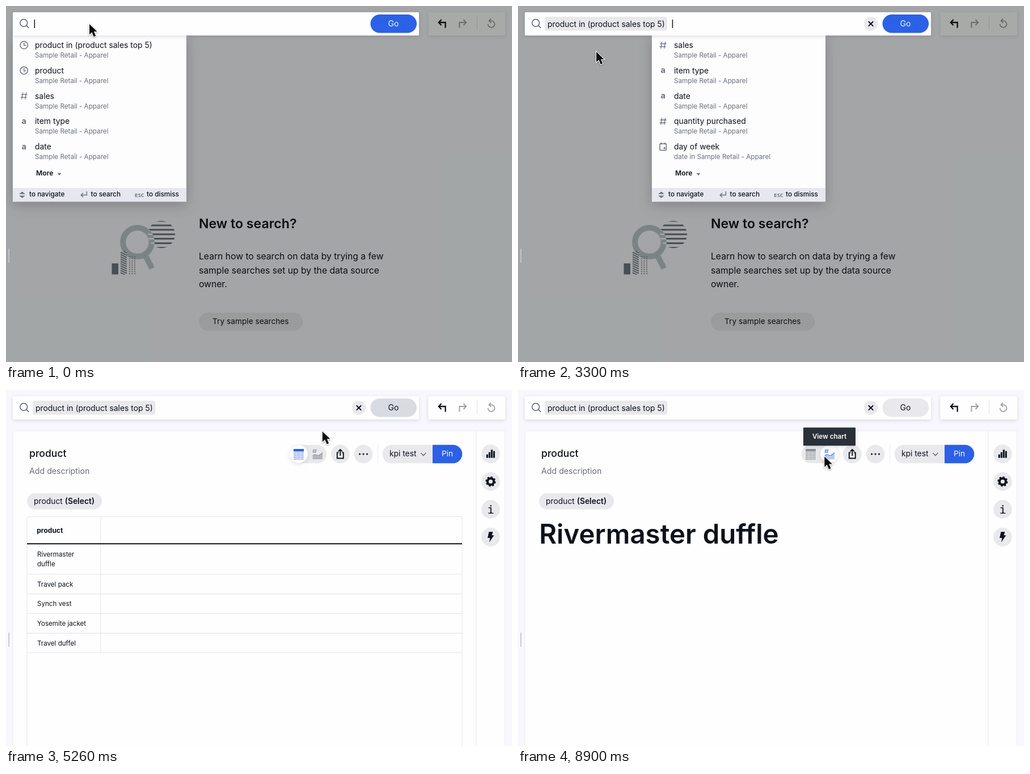
Animation, 892 px wide and 628 px high, one loop 8.93 s. Source, as an HTML page:

```html
<!DOCTYPE html>
<html lang="en">
<head>
<meta charset="utf-8">
<title>Search to answer</title>
<style>
  html, body { margin: 0; width: 100%; height: 100%; overflow: hidden; background: #f7f7fd; }
  svg { display: block; width: 892px; height: 628px; }
  text { font-family: Inter, "Liberation Sans", sans-serif; font-optical-sizing: none; white-space: pre; }
  .mono { font-family: "Noto Sans Mono", "DejaVu Sans Mono", monospace; }
  .card { filter: drop-shadow(0 2px 3px rgba(30, 34, 50, .13)); }
  .menu { filter: drop-shadow(0 6px 11px rgba(45, 35, 55, .26)); }
  .pointer { filter: drop-shadow(0 1.5px 1.5px rgba(0, 0, 0, .35)); }
</style>
</head>
<body>
<svg id="stage" viewBox="0 0 892 628"></svg>
<script>
const LOOP = 8930;
const INK = '#0c111b', GREY = '#6b7280', SOFT = '#e9e9ed', BLUE = '#2b60e8', LINE = '#e6e6ea';

// Markup helpers
const text = (x, y, s, size, fill = INK, weight = 400, more = '') =>
  `<text x="${x}" y="${y}" font-size="${size}" fill="${fill}" font-weight="${weight}" ${more}>${s}</text>`;
const rect = (x, y, w, h, fill, r = 0, more = '') =>
  `<rect x="${x}" y="${y}" width="${w}" height="${h}" rx="${r}" fill="${fill}" ${more}/>`;
const disc = (x, y, r, fill, more = '') => `<circle cx="${x}" cy="${y}" r="${r}" fill="${fill}" ${more}/>`;
const fill = (d, color, more = '') => `<path d="${d}" fill="${color}" ${more}/>`;
const line = (d, color, w, more = '') => `<path d="${d}" fill="none" stroke="${color}" stroke-width="${w}" ${more}/>`;
const group = (id, body, more = '') => `<g id="${id}" ${more}>${body}</g>`;
const at = (x, y, body) => `<g transform="translate(${x} ${y})">${body}</g>`;
const clip = (id, shape, body) => `<clipPath id="${id}">${shape}</clipPath><g clip-path="url(#${id})">${body}</g>`;
const range = (n, f) => Array.from({ length: n }, (_, i) => f(i)).join('');

// Suggestion menu
const icons = {
  clock: disc(0, 0, 6.6, 'none', `stroke="${GREY}" stroke-width="1.5"`) + line('M0 -4V.6H3.6', GREY, 1.5),
  number: line('M-2 -6L-4 6M4 -6L2 6M-5 -2.4H6M-6 2.6H5', GREY, 1.3),
  label: text(0, 4.6, 'a', 14.6, GREY, 700, 'text-anchor="middle"'),
  calendar: rect(-5.7, -5.2, 11.4, 11.4, 'none', 1, `stroke="${GREY}" stroke-width="1.5"`) +
    rect(1, 1, 3, 3, GREY) + line('M-3.2 -7.2V-4M3.2 -7.2V-4', GREY, 1.7)
};
const SET = 'Sample Retail - Apparel';
const row = {
  recent: ['clock', 'product in (product sales top 5)'],
  product: ['clock', 'product'],
  sales: ['number', 'sales'],
  type: ['label', 'item type'],
  date: ['label', 'date'],
  quantity: ['number', 'quantity purchased'],
  day: ['calendar', 'day of week', 'date in ' + SET]
};

function menu(id, rows, verb, picked, dx = 0) {
  const more = rows.length > 4;
  const foot = more ? 321 : 64 + 44.8 * rows.length;
  const shift = verb === 'select' ? 2 : 0;
  const items = rows.map(([icon, name, sub = SET], i) => {
    const y = 44.8 * i;
    return at(31.7, 69 + y, icons[icon]) + text(51, 74 + y, name, 13.9) + text(51, 91 + y, sub, 11.7, '#6a6f7c');
  }).join('');
  const footer = rect(12, 0, 306, 24.3, '#e7e8ef') +
    fill('M23 10.8L28.5 6.4L34 10.8ZM23 13.4L28.5 17.8L34 13.4Z', GREY) +
    text(41, 15, 'to navigate', 11.8, INK, 500) +
    at(shift, 0, line('M142.3 6V12.6H132.5M136 9L132.3 12.6L136 16.2', GREY, 1.5) +
      text(149.5, 15, 'to ' + verb, 11.8, INK, 500)) +
    text(227, 16, 'ESC', 9.1, GREY, 700, 'class="mono"') +
    text(248, 15, 'to dismiss', 11.8, INK, 500);
  return group(id,
    rect(12, 50, 306, foot - 26, '#fdfdfe', 0, 'class="menu"') +
    (picked ? rect(12, 55.6, 306, 44.8, '#e5eafa') : '') + items +
    (more ? text(53, 299, 'More', 12.2, INK, 600) + fill('M90.5 294.8H97.5L94 298.9Z', GREY) : '') +
    at(0, foot, footer), `transform="translate(${dx} 0)"`);
}

const menus = [
  [0, 'recents', [row.recent, row.product, row.sales, row.type, row.date], 'search', false],
  [800, 'picked', [row.recent, row.product, row.sales, row.type, row.date], 'select', true],
  [1160, 'wide', [row.recent, row.product, row.quantity, row.type, row.day], 'select', true],
  [1600, 'narrow', [row.recent, row.product, row.type, row.quantity], 'select', true],
  [2160, 'exact', [row.recent, row.product], 'select', true],
  [3200, 'next', [row.sales, row.type, row.date, row.quantity, row.day], 'search', false, 224]
];

// Empty state with its illustration
function welcome() {
  const stripes = color => range(7, i => line(`M249 ${379 + 7.9 * i}H299`, color, 3));
  const ball = disc(274, 403, 24);
  const hatch = range(11, i => line(`M201 ${430 + 4 * i}l13 6`, GREY, 1.9));
  const dots = range(27, i => rect(217 + 4.6 * (i % 3), 441 + 3.8 * (i / 3 | 0), 1.7, 1.7, GREY));
  return clip('ball', ball, stripes(GREY)) +
    disc(231.5, 416.5, 25.3, 'none', 'stroke="#b9c2cb" stroke-width="10"') +
    line('M245.5 440L257.5 463', '#b9c2cb', 10) +
    clip('lens', disc(231.5, 416.5, 30.3), clip('overlap', ball, stripes('#f3f4f8'))) +
    rect(186.5, 454, 11.5, 19.5, GREY) + rect(202, 433, 11, 40.5, '#f7f7fd') +
    clip('bar', rect(202, 433, 11, 40.5), hatch) + dots +
    text(340, 391.9, 'New to search?', 23.1, INK, 600) +
    text(340, 447, 'Learn how to search on data by trying a few', 15.68) +
    text(340, 471.6, 'sample searches set up by the data source', 15.68) +
    text(340, 496, 'owner.', 15.68) +
    rect(340, 541, 183.5, 32, SOFT, 16) +
    text(431.3, 560.6, 'Try sample searches', 13.7, INK, 400, 'text-anchor="middle"');
}

const tableIcon = (head, cell) => rect(507, 104, 18, 4.4, head) +
  range(15, i => rect(507 + 6.1 * (i % 3), 109.3 + 2.9 * (i / 3 | 0), 5.6, 2.2, cell));
const chartIcon = (mark, area, id = '') => group(id,
  line('M543 104L542 111.4M546.2 104L545.2 111.4M540.4 106.3H547.6M540 109.2H547', mark, 1) +
  fill('M540.5 117Q544 113.5 548 116T558 111.5V122.3H540.5Z', area) +
  line('M540.5 116Q544 112.8 548 115T558 110.5', mark, 1.3));
const knob = x => disc(x, 113, 16, '#fdfdff', 'class="card"');

function answer() {
  const round = (x, y, body) => disc(x, y, 16.4, SOFT) + at(x, y, body);
  const dim = '#8d9096', pale = '#b3b5ba';
  const names = ['Travel pack', 'Synch vest', 'Yosemite jacket', 'Travel duffel'];
  const table = rect(37.5, 272, 766, 53, '#f1f2f6', 0, 'id="rowHover"') +
    line('M37 640V223.5H804V640', LINE, 1) + line('M167 224V463', LINE, 1) +
    [325, 359.7, 394.4, 429.2, 463].map(y => line(`M37 ${y}H804`, LINE, 1.2)).join('') +
    line('M37 271.3H804', INK, 2) +
    text(54.3, 252.3, 'product', 12, INK, 700) +
    text(55, 294.3, 'Rivermaster', 11.6) + text(55, 310.8, 'duffle', 11.6) +
    names.map((s, i) => text(55, 346.6 + 34.7 * i, s, 11.6)).join('');
  return rect(12, 72, 867.5, 570, '#fefefe', 0, 'stroke="#ededf3"') + line('M829 72V628', '#e8e8ef', 1) +
    rect(36, 130.5, 765, 25, '#f1f1f5', 3, 'id="noteHover"') +
    text(41, 118.3, 'product', 17.6, INK, 500) +
    text(41, 147.6, 'Add description', 14.2, '#696e7a') +
    rect(37, 182, 132.3, 28.5, SOFT, 14.2) +
    text(49, 201, 'product <tspan font-weight="600">(Select)</tspan>', 13.85) +
    rect(500, 96.7, 65, 32.5, SOFT, 16.2) +
    group('tableMode', knob(516) + tableIcon(BLUE, '#aec0f6') + chartIcon(dim, pale, 'chartIdle')) +
    group('chartMode', knob(549) + tableIcon(dim, pale) + chartIcon('#4c7df0', '#b3c9f8')) +
    round(589.3, 113, line('M-3 -2.5H-5.5V7.5H5.5V-2.5H3M0 3V-7.5M-3.6 -4.6L0 -8L3.6 -4.6', INK, 1.9)) +
    round(630, 113, disc(-6.4, 0, 1.6, INK) + disc(0, 0, 1.6, INK) + disc(6.4, 0, 1.6, INK)) +
    line('M655.5 97V129', '#ececf0', 1) +
    fill('M752 96.7H680A16.2 16.2 0 0 0 680 129.2H752Z', SOFT) +
    fill('M752 96.7H788A16.2 16.2 0 0 1 788 129.2H752Z', BLUE) +
    text(676, 117.4, 'kpi test', 13.8) + line('M731.3 111L735.8 115.5L740.3 111', GREY, 1.7) +
    text(778, 117.4, 'Pin', 13.7, '#fff', 400, 'text-anchor="middle"') +
    round(854.4, 112.7, range(4, i => rect(-7.6 + 4 * i, [1, -3, -7.5, -5][i], 3, [6, 10, 14.5, 12][i], INK))) +
    round(854.4, 161.5, disc(0, 0, 5.6, 'none', `stroke="${INK}" stroke-width="4"`) +
      disc(0, 0, 7.8, 'none', `stroke="${INK}" stroke-width="2.6" stroke-dasharray="3.06"`)) +
    round(854.4, 210.5, text(0, 7.3, 'i', 20, INK, 500, 'class="mono" text-anchor="middle"')) +
    round(854.4, 259.3, fill('M-3 -9H4L2 -3H6L-2.6 9.5L-1 1.6H-5.4Z', INK)) +
    group('table', table) +
    group('headline', text(37.2, 270.6, 'Rivermaster duffle', 47.4, INK, 600)) +
    group('tip', rect(503, 66.3, 92, 32, '#2a3039', 1, 'class="card"') +
      text(549, 86.1, 'View chart', 11.6, '#fff', 600, 'text-anchor="middle"'));
}

const toolbar = rect(744.5, 11, 135.5, 41, '#fefefe', 2, 'class="card"') +
  line('M767.5 24L762.8 29L767.5 34M763 29H774.6V38.5', INK, 2.3) +
  line('M806.5 24L811.2 29L806.5 34M811 29H799.4V38.5', '#9d9fa6', 1.9) +
  line('M830.5 19V43', '#e2e2e8', 1) +
  line('M849.6 32A5.9 5.9 0 1 0 855.5 26.1H852M855.2 22.3L851.4 26.1L855.2 29.9', '#9d9fa6', 1.8);

const searchBar = rect(12, 11, 716, 41, '#fefefe', 2, 'class="card"') +
  disc(31.3, 29.8, 6.4, 'none', `stroke="${GREY}" stroke-width="1.7"`) + line('M36 34.5L40.3 38.8', GREY, 1.8) +
  group('chip', rect(47, 19, 216, 24.5, SOFT, 3) + text(52, 36.7, row.recent[1], 13.9)) +
  text(52, 36.7, '', 13.9, INK, 400, 'id="query"') +
  rect(50, 42.8, 0, 1, '#e2e2e8', 0, 'id="rule"') +
  rect(0, 24, 1.5, 15, INK, 0, 'id="caret"') +
  group('clear', disc(622, 31.4, 12.2, SOFT) + line('M617.8 27.2L626.2 35.6M626.2 27.2L617.8 35.6', INK, 2)) +
  rect(642.5, 15, 81.5, 32.4, BLUE, 16.2, 'id="go"') +
  text(683, 35.5, 'Go', 14.1, '#fff', 400, 'id="goText" text-anchor="middle"');

const BEAM = 'M-5 -10.5Q0 -10.5 0 -7.5Q0 -10.5 5 -10.5M0 -8V8M-5 10.5Q0 10.5 0 7.5Q0 10.5 5 10.5M-3 3H3';
const pointers =
  group('arrow', fill('M0 0V16.6L4 13L7 20.2L10.2 18.8L7.2 11.9H12.4Z', '#0b0b0b',
    'stroke="#fff" stroke-width="2" paint-order="stroke" transform="scale(1.1)"')) +
  group('beam', line(BEAM, '#fff', 3.6) + line(BEAM, '#111', 1.9)) +
  group('hand', fill('M-2 2Q0 -2 2 2L3.2 8Q5 6 6.6 8.4Q8.6 7 10 9.4Q13 8.6 13.4 12Q13.6 16 11.8 18V21H2V19.6Q-1 17 -3.4 13.6Q-7 10 -5.6 9Q-3.6 7.6 -.4 11Z',
    '#fff', 'stroke="#222" stroke-width="2.2" stroke-linejoin="round"') + line('M3.6 13V17.4M6.6 13V17.4M9.6 13V17.4', '#222', 1.7));

document.getElementById('stage').innerHTML =
  rect(0, 0, 892, 628, '#f7f7fd') + group('welcome', welcome()) + group('answer', answer()) + toolbar +
  rect(0, 0, 892, 628, 'rgba(6,14,4,.35)', 0, 'id="shade"') +
  line('M5 428V453', '#c3c9d4', 1.8) +
  menus.map(([, ...args]) => menu(...args)).join('') + searchBar +
  group('pointer', pointers, 'class="pointer"');

// Motion
const $ = id => document.getElementById(id);
const show = (id, on) => { $(id).style.display = on ? '' : 'none'; };
const ramp = (t, a, b) => Math.min(1, Math.max(0, (t - a) / (b - a)));
const ease = {
  line: u => u,
  in: u => u ** 1.6,
  out: u => 1 - (1 - u) ** 2,
  both: u => u * u * (3 - 2 * u)
};

// time, x, y, easing of the way there
const path = [
  [0, 147, 32], [800, 147, 32], [801, 147.5, 34], [2660, 147.5, 34],
  [2960, 141, 89, 'both'], [3200, 141, 89], [3660, 133.5, 68, 'out'], [3900, 133.5, 68],
  [4130, 692, 36.5, 'both'], [4800, 692, 36.5], [5260, 558, 73, 'in'], [5700, 480, 196, 'line'],
  [6100, 468, 292, 'out'], [6480, 468, 292], [6630, 494.5, 235, 'in'],
  [7130, 540.3, 117.5, 'out'], [LOOP, 540.3, 117.5]
];
const shapes = [[0, 'arrow'], [800, 'beam'], [2800, 'hand'], [3200, 'arrow'], [4080, 'hand'],
  [4900, 'arrow'], [7000, 'hand'], [8900, 'arrow']];
const typed = [1160, 1360, 1760, 1900, 2160, 2300];
const latest = (list, t) => list.filter(([s]) => s <= t).pop();

function place(t) {
  const i = Math.max(1, path.findIndex(p => p[0] > t));
  const [a, ax, ay] = path[i - 1], [b, bx, by, how = 'line'] = path[i];
  const u = ease[how](ramp(t, a, b));
  return [ax + (bx - ax) * u, ay + (by - ay) * u];
}

function draw(t) {
  const [x, y] = place(t);
  const shape = latest(shapes, t)[1];
  $('pointer').setAttribute('transform', `translate(${x} ${y})`);
  for (const id of ['arrow', 'beam', 'hand']) show(id, id === shape);

  const open = t < 4360, chip = t >= 3200;
  const current = latest(menus, t)[1];
  for (const [, id] of menus) show(id, open && id === current);
  show('shade', open);
  show('chip', chip);
  show('clear', t >= 1160);

  const count = chip ? 0 : typed.filter(s => s <= t).length;
  $('query').textContent = 'produc'.slice(0, count);
  const end = count ? 52 + $('query').getComputedTextLength() : 50;
  show('rule', count > 0);
  $('rule').setAttribute('width', end - 47);
  $('caret').setAttribute('x', chip ? 271.7 : count ? end : 49.6);
  show('caret', t < 260 || (t >= 760 && t < 2800) || (chip && t < 3900));

  $('go').setAttribute('fill', open ? BLUE : t < 7330 ? '#d9dbe3' : SOFT);
  $('goText').setAttribute('fill', open ? '#fff' : INK);

  const ready = t >= 4530, chart = t >= 7500;
  show('welcome', !ready);
  show('answer', ready);
  show('table', !chart);
  show('tableMode', !chart);
  show('chartMode', chart);
  show('rowHover', y > 272);
  show('noteHover', y > 131 && y < 155);
  $('chartIdle').style.filter = t >= 7000 ? 'brightness(.7)' : '';
  $('headline').style.opacity = ramp(t, 7470, 7630);
  show('headline', chart);
  $('tip').style.opacity = ease.both(ramp(t, 7900, 8300));
}

const start = performance.now();
function tick() {
  draw((performance.now() - start) % LOOP);
  requestAnimationFrame(tick);
}
tick();
</script>
</body>
</html>
```
